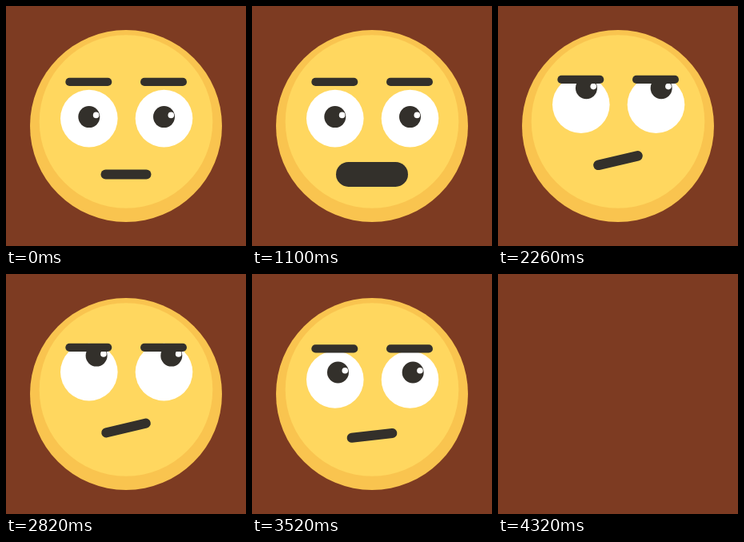
Animation of 300x300 px, one loop 4.34 s. Source, as an HTML page with a canvas:

```html
<!DOCTYPE html>
<html>
<head>
<meta charset="utf-8">
<style>
html, body { margin: 0; width: 100%; height: 100%; overflow: hidden; background: #7d3b22; }
canvas { display: block; width: 100vmin; height: 100vmin; }
</style>
</head>
<body>
<canvas id="stage" width="300" height="300"></canvas>
<script>
const ctx = document.getElementById('stage').getContext('2d');
const LOOP = 4340, BLANK_AT = 4315, DARK = '#33302b';

const mix = (a, b, p) => a + (b - a) * p;

// Cubic ease in-out between two times, clamped to 0..1
function ease(t, start, end) {
  const u = Math.min(1, Math.max(0, (t - start) / (end - start)));
  return u < 0.5 ? 4 * u ** 3 : 1 - 4 * (1 - u) ** 3;
}

function disc(x, y, r, color) {
  ctx.fillStyle = color;
  ctx.beginPath();
  ctx.arc(x, y, r, 0, 2 * Math.PI);
  ctx.fill();
}

// Round-ended bar centred on (x, y)
function bar(x, y, w, h, degrees = 0) {
  ctx.save();
  ctx.translate(x, y);
  ctx.rotate(degrees * Math.PI / 180);
  ctx.strokeStyle = DARK;
  ctx.lineCap = 'round';
  ctx.lineWidth = h;
  ctx.beginPath();
  ctx.moveTo((h - w) / 2, 0);
  ctx.lineTo((w - h) / 2, 0);
  ctx.stroke();
  ctx.restore();
}

// Pupil offset from the eye centre: glance about, roll up, return
function gaze(t) {
  const roll = ease(t, 1500, 2540), back = ease(t, 2800, 4120);
  const glance = -25.5 * Math.sin(2 * Math.PI * Math.min(t, 1237.5) / 550);
  const arc = -6 * Math.sin(Math.PI * roll) * roll;
  return {
    x: mix(mix(glance, 9, roll), 0, back),
    y: mix(mix(-2, -20.5, roll) + arc, -2.2, back)
  };
}

function draw(t) {
  ctx.fillStyle = '#7d3b22';
  ctx.fillRect(0, 0, 300, 300);
  if (t >= BLANK_AT) return;

  const raise = ease(t, 1160, 2540) - ease(t, 2800, 4220);
  const open = ease(t, 0, 860);
  const shut = ease(t, 1160, 2540);
  const narrow = ease(t, 1160, 2080);

  disc(150, 150, 120, '#f9c44f');
  disc(150, 144.5, 108.3, '#ffd75f');

  const eyeY = mix(140.6, 122.6, raise), look = gaze(t);
  for (const x of [103.8, 197.5]) {
    const px = x + look.x + 0.3, py = eyeY + look.y;
    disc(x, eyeY, 35.8, '#fff');
    disc(px, py, 13.5, DARK);
    disc(px + 8.8, py - 2.2, 3.8, '#fff');
    bar(x - 0.5, mix(94.9, 91.8, raise), 58, 10.2);
  }

  bar(150, mix(210.4, 192.5, raise),
    63 + 27 * (open - narrow), 12 + 19 * (open - shut), -13.5 * raise);
}

function tick() {
  draw(performance.now() % LOOP);
  requestAnimationFrame(tick);
}
tick();
</script>
</body>
</html>
```
